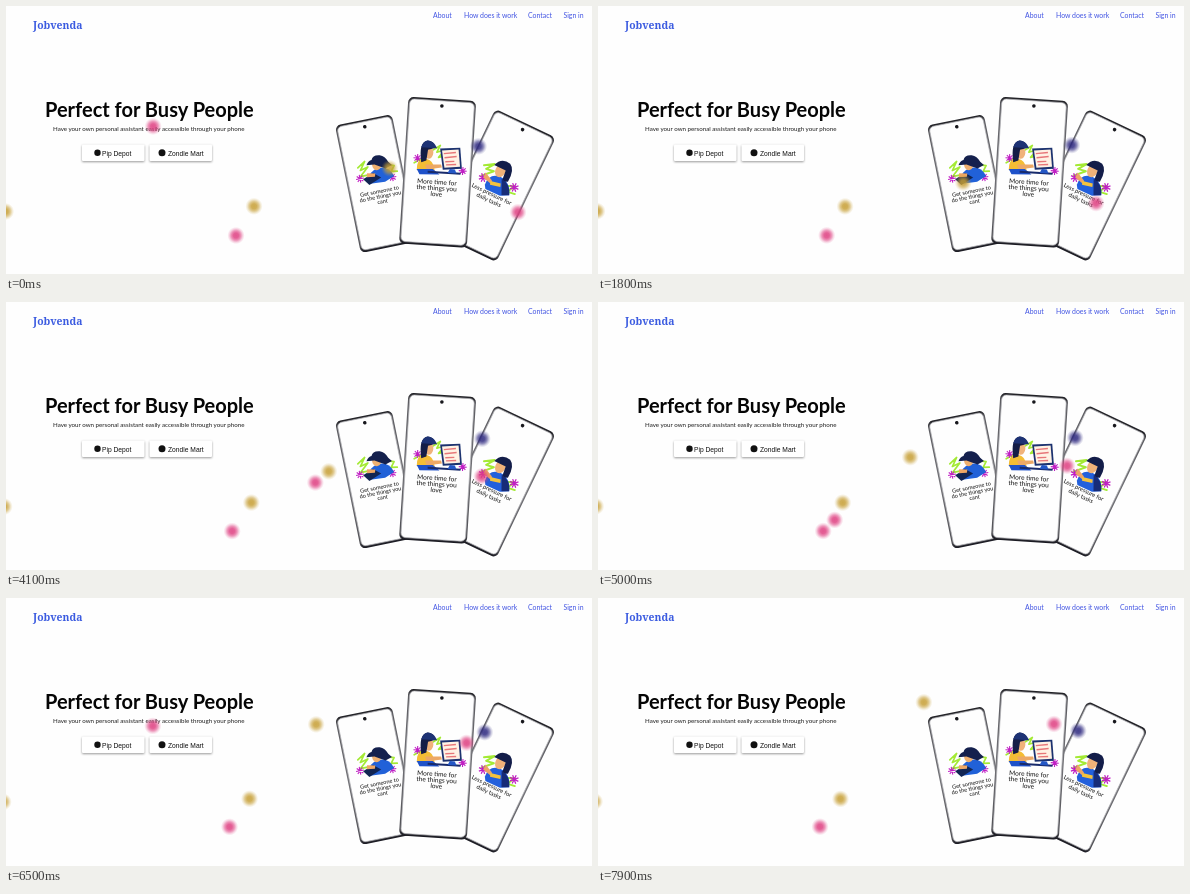
An HTML page with a canvas that plays this animation: 586 by 268 pixels, repeating every 8 s.

```html
<!DOCTYPE html>
<html lang="en">
<head>
<meta charset="utf-8">
<title>Personal assistant landing page</title>
<style>
  html, body { margin: 0; width: 100%; height: 100%; overflow: hidden; background: #fefefe; }
  svg, canvas { position: absolute; left: 0; display: block; }
  svg { top: 0; font-family: Lato, sans-serif; }
  canvas { top: 87px; width: 586px; height: 181px; }
  .brand { font: 700 10.4px "Noto Serif", serif; fill: #3b5be0; }
  .nav { font-size: 6.9px; fill: #4053e2; }
  .title { font-weight: 700; font-size: 20px; fill: #050505; }
  .lead { font-size: 6.2px; fill: #1c1c1c; }
  .store { font: 6.7px "Liberation Sans", Arial, sans-serif; fill: #111; }
  .button { fill: #fff; filter: drop-shadow(0 1px 1.3px rgba(0,0,0,.4)); }
  .caption { text-anchor: middle; fill: #111; }
  .scribble { fill: none; stroke: #a4ea35; stroke-width: 1.7; stroke-linejoin: round; stroke-linecap: round; }
  .spark { fill: none; stroke: #c01fc4; stroke-width: 1.1; }
</style>
</head>
<body>
<svg width="586" height="268" viewBox="0 0 586 268">
  <defs>
    <linearGradient id="rim" x1="0" y1="0" x2="0" y2="1">
      <stop offset="0" stop-color="#1d1d22"/>
      <stop offset=".05" stop-color="#5c5c61"/>
      <stop offset=".5" stop-color="#727277"/>
      <stop offset=".95" stop-color="#505055"/>
      <stop offset="1" stop-color="#17171f"/>
    </linearGradient>
    <path id="spark" class="spark" d="M-4 0H4M0-4V4M-2.8-2.8 2.8 2.8M-2.8 2.8 2.8-2.8"/>
  </defs>

  <text class="brand" x="27" y="23">Jobvenda</text>
  <g class="nav">
    <text x="427" y="11.7">About</text>
    <text x="458" y="11.7">How does it work</text>
    <text x="522" y="11.7">Contact</text>
    <text x="557.5" y="11.7">Sign in</text>
  </g>

  <text class="title" x="39" y="111">Perfect for Busy People</text>
  <text class="lead" x="47" y="125.3">Have your own personal assistant easily accessible through your phone</text>
  <g class="store">
    <rect class="button" x="76" y="138.5" width="62.5" height="16.5" rx="1"/>
    <circle cx="91.5" cy="146.7" r="3.2" fill="#111"/>
    <text x="96" y="149.6">Pip Depot</text>
    <rect class="button" x="143.5" y="138.5" width="62.5" height="16.5" rx="1"/>
    <circle cx="156" cy="146.7" r="3.5" fill="#111"/>
    <text x="162" y="149.6">Zondle Mart</text>
  </g>

  <g transform="translate(370.3 177.6) rotate(-11.5)">
    <g class="phone" data-size="58 130"></g>
    <g transform="translate(3 -17)">
      <path class="scribble" d="M-18-2l8-5-6 8 8-2-9 8 7 0"/>
      <path class="scribble" d="M12 1l6 2-4 5 6 1"/>
      <use href="#spark" x="-18" y="9"/>
      <use href="#spark" x="14" y="14"/>
      <path d="M-10 13Q-8 3 2 2 13 2 16 13L6 17-9 16Z" fill="#2161d8"/>
      <ellipse cx="1" cy="-1" rx="4.500" ry="5" fill="#efb070"/>
      <path d="M-9-3Q-6-7-3-7-1-12 6-10 11-8 13-2L16 2 9 4-1-2Z" fill="#14204d"/>
      <path d="M-15 10-4 6 3 12-10 17Z" fill="#122553"/>
      <path d="M-10 5l8 2-1 3-8-1Z" fill="#efa765"/>
    </g>
    <g class="caption" font-size="5.6">
      <text x="1.5" y="10">Get someone to</text>
      <text x="1.5" y="15.3">do the things you</text>
      <text x="2.5" y="20.6">cant</text>
    </g>
  </g>

  <g transform="translate(489.8 179.5) rotate(25.6)">
    <g class="phone" data-size="67 138"></g>
    <g transform="translate(-1 -12) scale(1.15)">
      <path class="scribble" d="M-16-1l8-5-5 7 7-1-8 8"/>
      <path class="scribble" d="M9 7l7-3-4 7 7-1"/>
      <use href="#spark" x="-12" y="9"/>
      <use href="#spark" x="16" y="5"/>
      <path d="M-8 14Q-9 3 1 2 11 2 15 13L8 17-6 17Z" fill="#2360dc"/>
      <ellipse cx="-1" cy="-3" rx="4.500" ry="6" fill="#f0b279"/>
      <path d="M-8-5Q-5-14 4-12 10-9 9 3L4 5 3-5Z" fill="#131d49"/>
      <path d="M3 3Q12 4 15 13L9 16Z" fill="#172c78"/>
      <path d="M-12 4-4 8-3 11-12 9Z" fill="#eda467"/>
      <path d="M-5 9 4 7 5 10-4 12Z" fill="#f4c23e"/>
    </g>
    <g class="caption" font-size="5.9">
      <text y="11.500">Less pressure for</text>
      <text y="18">daily tasks</text>
    </g>
  </g>

  <g transform="translate(431.6 166.3) rotate(3.7)">
    <g class="phone" data-size="68 147"></g>
    <g transform="translate(0 -13)">
      <path class="scribble" d="M-6-9l7-5-3 7 8-3-6 8 7-2"/>
      <path class="scribble" d="M-24 5l6-4-1 7 5-3"/>
      <use href="#spark" x="-21" y="0"/>
      <use href="#spark" x="25" y="10"/>
      <path d="M-21 12Q-22 1-13 0-4 1-3 12Z" fill="#f4bd35"/>
      <ellipse cx="-10" cy="-6" rx="4.500" ry="6" fill="#f0b27a"/>
      <path d="M-17 4Q-21-16-12-18-5-18-4-11L-11-9-12 2Z" fill="#141d46"/>
      <path d="M-18-11Q-16-19-10-18-5-17-2-11Z" fill="#1d3274"/>
      <path d="M-13 6 3 5 4 8-11 11Z" fill="#eca866"/>
      <path d="M-21 11-5 10 2 15-18 16Z" fill="#1e51c9"/>
      <path d="M-10 12H23V14H-10Z" fill="#182b6c"/>
      <path d="M1-11 21-13 24 8 5 10Z" fill="#1c326f"/>
      <path d="M3-9 19.500-11 22 6 6.500 8Z" fill="#fff2e4"/>
      <path d="M5-6l12-2M6-2l12-2M7 2l9-1M8 5l10-1" fill="none" stroke="#e77779" stroke-width="1.4"/>
      <path d="M12 9h5l2 4h-9Z" fill="#2457c5"/>
    </g>
    <g class="caption" font-size="6.5">
      <text y="12">More time for</text>
      <text y="18">the things you</text>
      <text y="24">love</text>
    </g>
  </g>
</svg>
<canvas></canvas>

<script>
const TOP = 87, WIDTH = 586, HEIGHT = 181, LOOP = 8000;
const PINK = '222,62,128', GOLD = '198,158,52', NAVY = '43,38,126';

// Phone bodies share one look; only their sizes differ.
for (const phone of document.querySelectorAll('.phone')) {
  const [w, h] = phone.dataset.size.split(' ').map(Number);
  phone.innerHTML =
    `<rect x="${-w / 2}" y="${-h / 2}" width="${w}" height="${h}" rx="5.5" fill="url(#rim)"/>
     <rect x="${1.7 - w / 2}" y="${1.9 - h / 2}" width="${w - 3.4}" height="${h - 4.2}" rx="4.5"
       fill="#fefefe" stroke="#b4b4b8" stroke-width=".7"/>
     <circle cy="${7 - h / 2}" r="1.8" fill="#17171c"/>`;
}

const orbit = (cx, cy, radius, start, speed) => step => {
  const angle = (start + speed * step) * Math.PI / 180;
  return [cx + radius * Math.cos(angle), cy + radius * Math.sin(angle)];
};
const drift = (x, y, dx, dy) => step => [x + dx * step / 73, y + dy * step / 73];

const dots = [
  { color: GOLD, at: drift(-0.5, 205.5, -3, -2) },
  { color: GOLD, at: drift(248, 200.3, -5.5, 0.6) },
  { color: PINK, at: drift(230, 229.5, -8, -0.8) },
  { color: NAVY, at: drift(472.5, 140.3, 7.7, -7.5) },
  { color: PINK, at: orbit(564.8, 109.7, 110, 118.7, 0.723) },
  { color: GOLD, at: orbit(350, 138, 41.5, 35.8, 2.72) },
  { color: PINK, at: orbit(236.5, 128.2, 89.7, 185, 6.02) }
];

const canvas = document.querySelector('canvas');
const ctx = canvas.getContext('2d');
const ratio = window.devicePixelRatio || 1;
canvas.width = WIDTH * ratio;
canvas.height = HEIGHT * ratio;
ctx.scale(ratio, ratio);
ctx.translate(0, -TOP);

function drawDot(color, [x, y]) {
  const glow = ctx.createRadialGradient(x, y, 0, x, y, 8.6);
  for (const [stop, alpha] of [[0, .87], [.3, .82], [.55, .57], [.8, .2], [1, 0]]) {
    glow.addColorStop(stop, `rgba(${color},${alpha})`);
  }
  ctx.fillStyle = glow;
  ctx.fillRect(x - 9, y - 9, 18, 18);
}

// Two long holds, then ten steps a second.
function stepAt(time) {
  if (time < 500) return 0;
  if (time < 1000) return 2;
  return Math.floor(time / 100) - 6;
}

function render(now) {
  const step = stepAt(now % LOOP);
  ctx.clearRect(0, TOP, WIDTH, HEIGHT);
  for (const dot of dots) drawDot(dot.color, dot.at(step));
}

const startTime = performance.now();
function tick() {
  render(performance.now() - startTime);
  requestAnimationFrame(tick);
}
tick();
</script>
</body>
</html>
```
